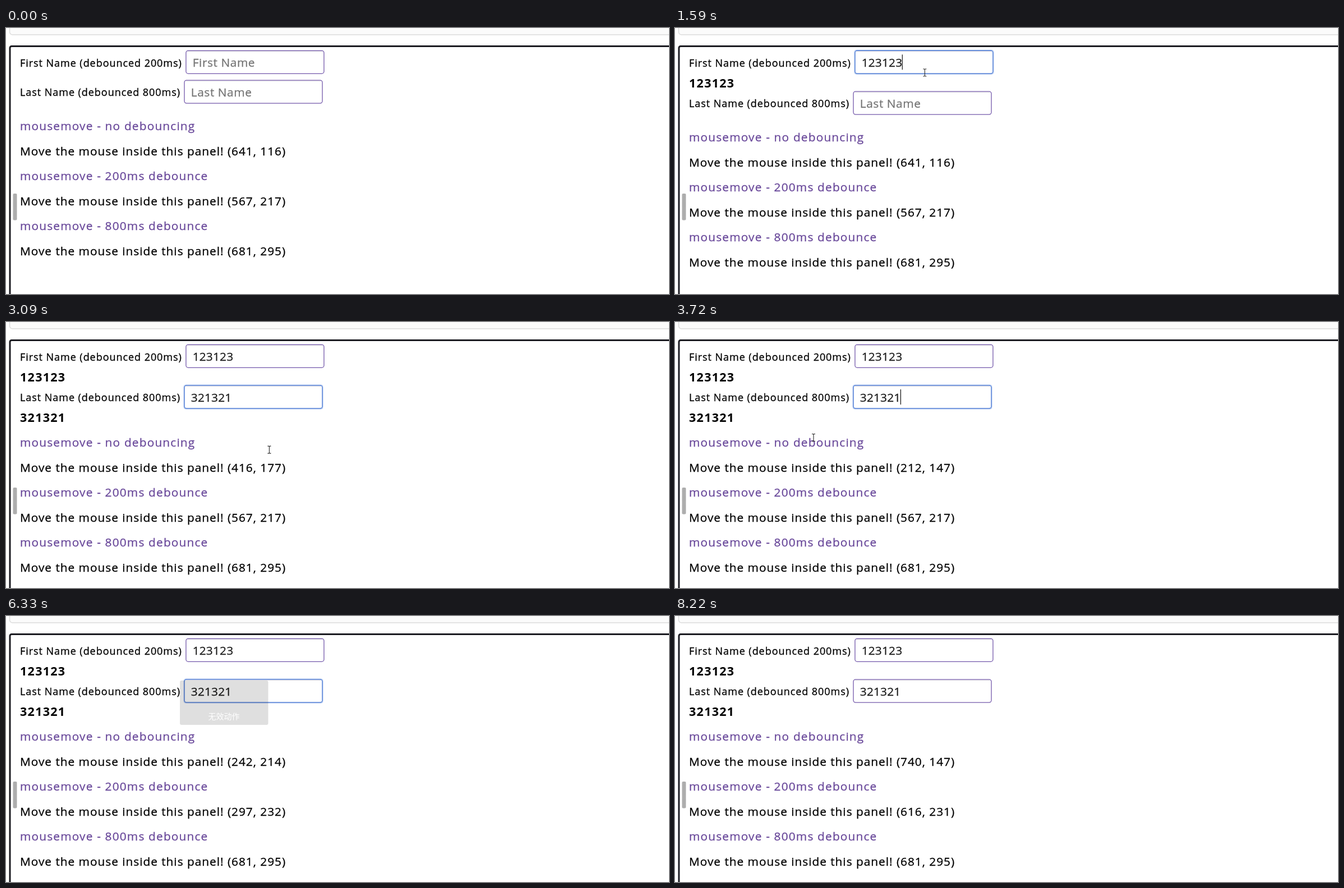
Animation of 1182 by 474 pixels, one loop 8290 ms. Source, as an HTML page:

```html
<!DOCTYPE html>
<html lang="en">
<head>
<meta charset="utf-8">
<title>Debounce demo</title>
<style>
  html, body { margin: 0; width: 100%; height: 100%; overflow: hidden; background: #fff; }
  svg { display: block; width: 1182px; height: 474px; }
  text { font-family: "Open Sans", "Noto Sans", sans-serif; white-space: pre; stroke-width: .3; }
  .label, .line { stroke: #000; }
  .label { font-size: 18px; letter-spacing: .95px; }
  .head { font-size: 20.8px; letter-spacing: 1.19px; fill: #69489a; stroke: #69489a; }
  .line { font-size: 20.8px; letter-spacing: 1px; }
  .echo { font-size: 21.5px; letter-spacing: 1.3px; font-weight: 700; }
  .value { font-size: 20.8px; letter-spacing: .2px; fill: #1c1c1c; stroke: #1c1c1c; }
  .value.empty { letter-spacing: .6px; fill: #757575; stroke: #757575; }
  .box { fill: #fff; stroke: #7459ab; stroke-width: 1.3; }
  .inner { stroke: #d9d7de; stroke-width: 1; }
  .focus .box { stroke: #5480d6; stroke-width: 1.5; }
  .ring { fill: none; stroke: #a9c2f0; stroke-width: 1; visibility: hidden; }
  .focus .ring { visibility: visible; }
  .caret { fill: #111; }
  .toast text { font: 14px "Noto Sans CJK SC", "Noto Sans CJK", sans-serif; fill: #fff; }
</style>
</head>
<body>
<svg viewBox="0 0 1182 474">
  <defs>
    <pattern id="grip" width="2" height="2" patternUnits="userSpaceOnUse">
      <rect width="2" height="2" fill="#b3b3b3"/>
      <rect width="1" height="1" fill="#9c9c9c"/>
    </pattern>
  </defs>
  <rect x="6.5" y="-20" width="1200" height="32" rx="5" fill="#fbfbfb" stroke="#dcdcdc" stroke-width="1.5"/>
  <rect x="7" y="32.5" width="1200" height="480" rx="3" fill="#fff" stroke="#1c1c22" stroke-width="3"/>

  <text class="label" x="25" y="69.3">First Name (debounced 200ms)</text>
  <g id="first"></g>
  <text class="echo" id="echo1" x="25" y="106">123123</text>

  <g id="row2">
    <text class="label" x="25" y="121.4">Last Name (debounced 800ms)</text>
    <g id="last"></g>
  </g>
  <text class="echo" id="echo2" x="25" y="178.4">321321</text>

  <g id="panels">
    <text class="head" x="25" y="181.8">mousemove - no debouncing</text>
    <text class="line" id="live" x="25" y="226.8"></text>
    <text class="head" x="25" y="270.7">mousemove - 200ms debounce</text>
    <text class="line" id="slow" x="25" y="315.6"></text>
    <text class="head" x="25" y="359.5">mousemove - 800ms debounce</text>
    <text class="line" x="25" y="404.5">Move the mouse inside this panel! (681, 295)</text>
  </g>

  <rect x="12.5" y="295" width="7" height="47.5" rx="2" fill="url(#grip)"/>

  <g class="toast" id="toast">
    <rect x="310" y="115" width="157.5" height="79" rx="3" fill="#000" fill-opacity=".125"/>
    <text x="388.5" y="184" text-anchor="middle">无效动作</text>
  </g>

  <g id="cursor">
    <path id="beam" d="M-3-6.5h2l1 1l1-1h2M0-5.5V5.5M-3 6.5h2l1-1l1 1h2" fill="none" stroke="#2b2b2b" stroke-width="1.1"/>
    <path id="arrow" d="M0 0V16.5L3.8 12.9L6.3 18.6L8.7 17.5L6.2 12H11.6Z" fill="#fff" stroke="#111"/>
  </g>
</svg>
<script>
const LOOP = 8290, STEP = 70, DEBOUNCE = 200, BLINK = 548;
const PANEL_TOP = 153, PANEL_H = 88.5, SHIFT = 20;
const FIRST_ECHO = 1480, LAST_ECHO = 3050;
const $ = id => document.getElementById(id);
const show = (el, on) => el.setAttribute('visibility', on ? 'visible' : 'hidden');
const move = (el, x, y) => el.setAttribute('transform', `translate(${x} ${y})`);
const clamp = (v, lo, hi) => Math.min(hi, Math.max(lo, v));

// Mouse glides: [from ms, to ms, x, y]; the mouse rests in between.
const glides = [
  [70, 700, 446, 64],
  [1480, 1830, 442, 154],
  [2390, 2730, 526, 236],
  [2940, 3640, 243, 194.25],
  [3640, 3710, 247, 206],
  [3780, 3990, 256.75, 255.5],
  [3990, 4690, 303, 300],
  [4690, 4830, 301, 302],
  [4830, 4970, 299, 304],
  [4970, 5180, 148, 300],
  [5640, 5740, 349.25, 300.5],
  [6150, 6300, 344, 490],
  [6440, 6700, 301, 405],
  [6900, 7130, 201, 390],
  [7350, 7630, 748, 299.25],
  [7630, 7770, 903, 194.25],
  [7770, 8050, 1081, -20]
];

function mouse(t) {
  let x = 1005, y = t < STEP ? -20 : 0;
  for (const [from, to, tx, ty] of glides) {
    const k = clamp((t - from) / (to - from), 0, 1);
    x += (tx - x) * k;
    y += (ty - y) * k;
  }
  return [x, y];
}

const shiftAt = t => SHIFT * ((t >= FIRST_ECHO) + (t >= LAST_ECHO));
const pageCoords = ([x, y]) => [(x + 22) / 1.25, (y - 10.5) / 1.25].map(Math.round);
const message = ([x, y]) => `Move the mouse inside this panel! (${x}, ${y})`;

// Replays mouse events up to t: panel 0 reacts at once, panel 1 after a pause.
function readings(t) {
  let live = [641, 116], slow = [567, 217], pending = null, due = 0, before = mouse(0);
  for (let s = STEP; s <= t; s += STEP) {
    const at = mouse(s);
    const moved = at[0] !== before[0] || at[1] !== before[1];
    const panel = Math.floor((at[1] - PANEL_TOP - shiftAt(s)) / PANEL_H);
    if (pending && s >= due) { slow = pending; pending = null; }
    if (moved && panel === 0) live = pageCoords(at);
    if (moved && panel === 1) { pending = pageCoords(at); due = s + DEBOUNCE; }
    before = at;
  }
  return { live, slow };
}

function field(id, x, y, hint, typed, start) {
  const g = $(id);
  g.innerHTML = `
    <rect class="ring" x="${x - .9}" y="${y - .9}" width="247.8" height="42.8" rx="3"/>
    <rect class="box" x="${x}" y="${y}" width="246" height="41" rx="4"/>
    <path class="inner" d="M${x + 3} ${y + 1.3}h240"/>
    <text class="value" x="${x + 11.8}" y="${y + 28.7}"></text>
    <rect class="caret" y="${y + 7}" width="1.2" height="27"/>`;
  const text = g.querySelector('text'), caret = g.querySelector('.caret');
  return (t, focused, blinkOn) => {
    const n = clamp(Math.floor((t - start) / STEP) + 1, 0, typed.length);
    text.textContent = n ? typed.slice(0, n) : hint;
    text.classList.toggle('empty', !n);
    g.classList.toggle('focus', focused);
    caret.setAttribute('x', x + 11.3 + n * 12.08);
    show(caret, focused && blinkOn);
  };
}
const first = field('first', 320.9, 40.3, 'First Name', '123123', 900);
const last = field('last', 318, 93.1, 'Last Name', '321321', 1850);

// Typing restarts the blink, so the caret stays on until the first toggle.
const blink = t => t < 2745 || Math.floor((t - 2745) / BLINK) % 2 === 1;

function draw(t) {
  first(t, t >= 760 && t < 1690, true);
  last(t, t >= 1690 && t < 8220, blink(t));
  show($('echo1'), t >= FIRST_ECHO);
  show($('echo2'), t >= LAST_ECHO);
  move($('row2'), 0, t >= FIRST_ECHO ? SHIFT : 0);
  move($('panels'), 0, shiftAt(t));

  // The page repaints one step behind the mouse.
  const held = Math.floor(t / STEP) * STEP;
  const { live, slow } = readings(held - STEP);
  $('live').textContent = message(live);
  $('slow').textContent = message(slow);

  const [x, y] = mouse(held);
  const arrow = x > 570 || y < 38;
  move($('cursor'), x, y);
  show($('beam'), y >= 0 && !arrow);
  show($('arrow'), y >= 0 && arrow);

  show($('toast'), t >= 6250 && t < 6750);
  $('toast').setAttribute('opacity', clamp((6750 - t) / 350, 0, 1));
}

const begin = performance.now();
function tick() {
  draw((performance.now() - begin) % LOOP);
  requestAnimationFrame(tick);
}
tick();
</script>
</body>
</html>
```
